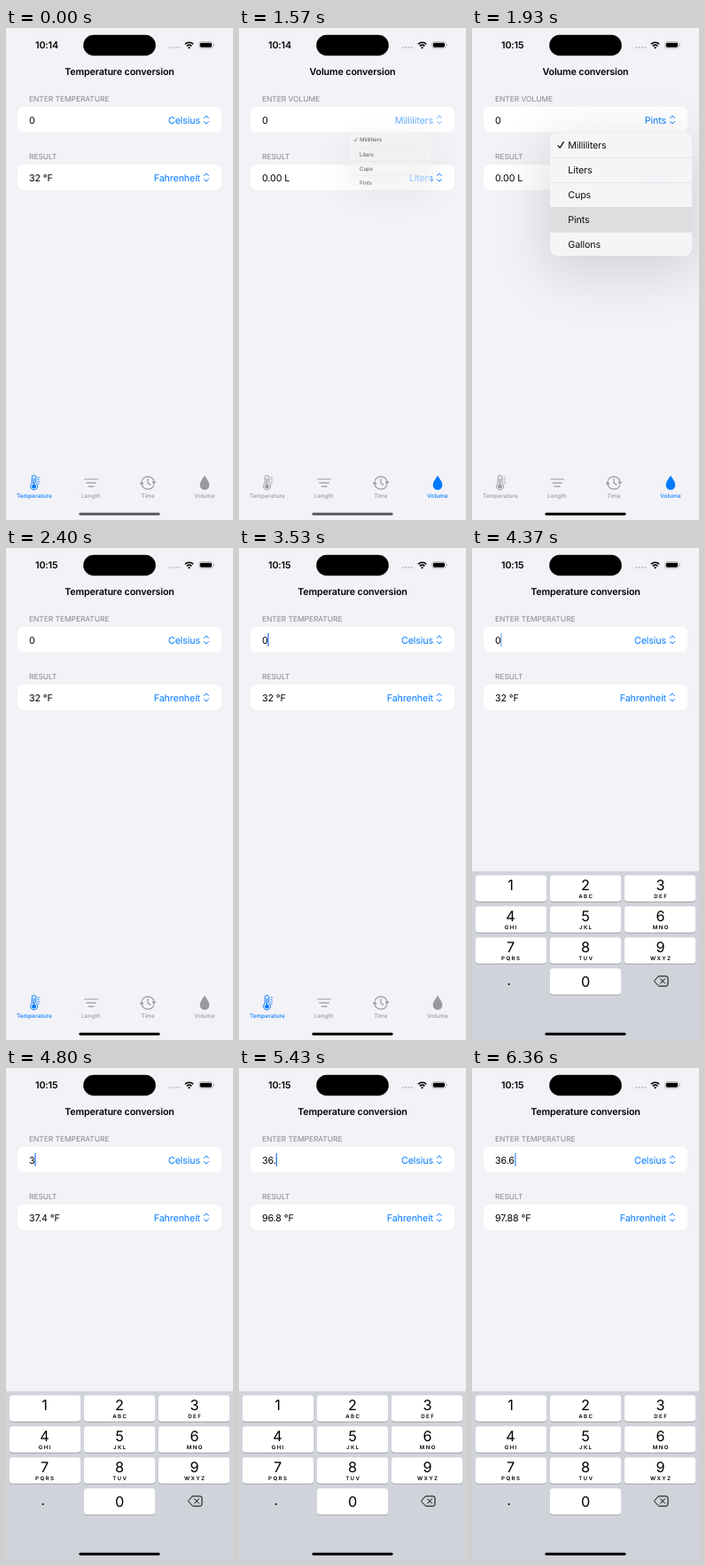
Write an HTML page that moves like this. It is 256 px wide and 555 px high and loops after 6.41 s.

```html
<!DOCTYPE html>
<html lang="en">
<head>
<meta charset="utf-8">
<title>Unit converter</title>
<style>
html, body { margin: 0; width: 100%; height: 100%; overflow: hidden; background: #f2f2f7; }
svg { display: block; width: 256px; height: 555px; font-family: Inter, "Liberation Sans", sans-serif; text-rendering: geometricPrecision; }
</style>
</head>
<body>
<svg id="stage" viewBox="0 0 256 555"></svg>
<script>
const LOOP = 6410, BLUE = '#007aff', GREY = '#98989d', INK = '#000';
const stage = document.getElementById('stage');
const clamp = v => Math.max(0, Math.min(1, v));
// Last row whose start time has passed
const at = (rows, t) => rows.filter(r => r[0] <= t).pop();

const TABS = ['Temperature', 'Length', 'Time', 'Volume'];
const UNITS = [['Celsius', 'Fahrenheit'], ['Meters', 'Kilometers'], ['Seconds', 'Minutes'], ['Milliliters', 'Liters']];
const RESULTS = ['32 °F', '0 km', '0.00 min', '0.00 L'];
const TAB_TIMES = [[0, 0], [530, 1], [870, 2], [1130, 3], [2400, 0]];
// time, entry, caret x, result
const ENTRIES = [
  [3530, '0', 33, '32 °F'], [4470, '', 26.7, '32 °F'], [4700, '3', 33, '37.4 °F'],
  [4930, '36', 39.3, '96.8 °F'], [5430, '36.', 42.3, '96.8 °F'], [5770, '36.6', 48.9, '97.88 °F']
];
// key, down, up
const PRESSES = [['del', 4430, 4500], ['3', 4670, 4770], ['6', 4900, 4970], ['6', 5730, 5800]];
const BLINKS = [4180, 5310, 6150];
const LETTERS = ['', 'ABC', 'DEF', 'GHI', 'JKL', 'MNO', 'PQRS', 'TUV', 'WXYZ'];

const text = (s, x, y, size, fill = INK, extra = '') =>
  `<text x="${x}" y="${y}" font-size="${size}" fill="${fill}" ${extra}>${s}</text>`;
const rect = (x, y, w, h, r, fill, extra = '') =>
  `<rect x="${x}" y="${y}" width="${w}" height="${h}" rx="${r}" fill="${fill}" ${extra}/>`;
const line = (d, color, width, extra = '') =>
  `<path d="${d}" fill="none" stroke="${color}" stroke-width="${width}" stroke-linecap="round" stroke-linejoin="round" ${extra}/>`;
const body = (s, x, y, fill, extra = '') => text(s, x, y, 10.7, fill, 'letter-spacing="-.12" ' + extra);

function statusBar(t) {
  let s = body(t < 1900 ? '10:14' : '10:15', 33, 23, INK, 'font-weight="600"');
  s += rect(87.2, 7.7, 81.6, 23.5, 11.75, INK);
  for (let i = 0; i < 4; i++) s += `<circle cx="${185 + i * 3.4}" cy="22" r="1.1" fill="#bdbdc2"/>`;
  s += line('M201.9 18.2a6.8 6.8 0 0 1 9.4 0M203.8 20.4a4.2 4.2 0 0 1 5.6 0', INK, 1.5, 'style="stroke-linecap:butt"');
  s += '<path d="M206.6 23.6l-1.6-1.7a2.4 2.4 0 0 1 3.2 0z"/>';
  s += rect(217.6, 15.5, 15.6, 7.4, 2.4, 'none', 'stroke="#a5a5a9" stroke-width=".7"');
  s += rect(218.8, 16.7, 13.2, 5, 1.4, INK);
  return s + '<path d="M234.2 18v2.6q1-.3 1-1.3t-1-1.3" fill="#a5a5a9"/>';
}

function field(label, value, unit, y, fade = 1) {
  return text(label, 26, y - 6.1, 8.4, '#85858a') +
    rect(13, y, 230, 28.5, 6.5, '#fff') + body(value, 26, y + 18.4) +
    `<g opacity="${fade}">` + body(unit, 219, y + 18.4, BLUE, 'text-anchor="end"') +
    line(`M223.4 ${y + 12.4}l2.5-2.5 2.5 2.5m-5 4l2.5 2.5 2.5-2.5`, BLUE, 1) + '</g>';
}

const ICONS = [
  c => line('M29.3 513.6V506.8a2.2 2.2 0 0 1 4.4 0V513.6a4 4 0 1 1-4.4 0z', c, 1) +
    line('M31.5 508.5v8', c, 1.2) + `<circle cx="31.5" cy="517.2" r="2.4" fill="${c}"/>` +
    line('M35.8 507h2M35.8 509.4h1.3M35.8 511.8h2M35.8 514.2h1.3', c, .8),
  c => line('M88.8 509h14.6M90.8 513.1h10.6M93.2 517.2h5.8', c, 1.2),
  c => line('M153.4 510.3a7.2 7.2 0 0 1 13.6 1.6M166.6 515.9a7.2 7.2 0 0 1-13.6-1.6M160 508.6v4.6l3 2.2', c, 1.2) +
    `<path d="M164.4 511.8h5l-2.5 3.3zM150.6 514.4h5l-2.5-3.3z" fill="${c}"/>`,
  c => `<path d="M224 504.8c1.6 3.2 5.3 6.6 5.3 10.9a5.3 5.3 0 0 1-10.6 0c0-4.3 3.7-7.7 5.3-10.9z" fill="${c}"/>`
];

function tabBar(active) {
  return TABS.map((name, i) => {
    const c = i === active ? BLUE : GREY;
    return ICONS[i](c) + text(name, 31.9 + i * 64, 530, 6.4, c, 'text-anchor="middle" font-weight="500" letter-spacing=".08"');
  }).join('');
}

function menu(t) {
  if (t < 1570 || t >= 2000) return '';
  const p = 1 - (1 - clamp((t - 1570) / 160)) ** 2.5;
  const out = t >= 1970 ? .45 : 1;
  const scale = (.57 + .43 * p) * (out < 1 ? .8 : 1);
  const h = 139 * (.73 + .27 * p);
  let s = rect(80, 126, 176, h + 14, 20, INK, `opacity="${.04 + .08 * p}" filter="url(#soft)"`);
  s += `<clipPath id="panel">${rect(88, 118, 160, h, 8, INK)}</clipPath>`;
  s += `<g clip-path="url(#panel)" opacity="${.65 + .35 * p}">` + rect(88, 118, 160, h, 8, '#f6f6f8', 'opacity=".97"');
  if (t >= 1900) s += rect(88, 202, 160, 28, 0, '#dedee0');
  ['Milliliters', 'Liters', 'Cups', 'Pints', 'Gallons'].forEach((name, i) => {
    const y = 118 + i * 28;
    if (i) s += rect(88, y, 160, .5, 0, '#d3d3d7');
    s += body(name, 108.3, y + 18, '#0c0c0d');
  });
  s += line('M97 132.6l2.2 2.6 4-6.6', INK, 1.2) + '</g>';
  return `<g opacity="${out}" transform="translate(174 118) scale(${scale}) translate(-174 -118)">${s}</g>`;
}

function keyboard(t) {
  if (t < 3600) return '';
  const k = (t - 3575) / 52;
  const drop = t >= 4000 ? 0 : 190 * (1 + k) * Math.exp(-k);
  const down = key => PRESSES.some(p => p[0] === key && t >= p[1] && t < p[2]);
  const cap = (key, x, y) => rect(x, y + .8, 80, 29.4, 3.2, '#8b8d92') +
    rect(x, y, 80, 29.4, 3.2, down(key) ? '#b4b8c1' : '#fff');
  const digit = (n, x, y) => text(n, x, y, 16.2, INK, 'text-anchor="middle"');
  let s = rect(0, 364.6, 256, 191, 0, '#d1d3da');
  LETTERS.forEach((abc, i) => {
    const col = i % 3 - 1, y = 369.3 + Math.floor(i / 3) * 35, x = 128 + col * 84.5;
    s += cap(String(i + 1), 88 + col * 84, y) + digit(i + 1, x, y + 16.6) +
      text(abc, x + .7, y + 25.5, 6.1, INK, 'text-anchor="middle" font-weight="600" letter-spacing="1.4"');
  });
  s += cap('0', 88, 474.3) + digit(0, 128, 495) + digit('.', 41.5, 493);
  const del = down('del');
  s += line('M210.6 483h8.4a2 2 0 0 1 2 2v7.2a2 2 0 0 1-2 2h-8.4l-4.6-4.9q-.5-.7 0-1.4z', INK, 1,
    del ? 'style="fill:#000"' : '');
  s += line('M212.6 486l5 5.2m0-5.2l-5 5.2', del ? '#fff' : INK, 1);
  return `<g transform="translate(0 ${drop})">${s}</g>`;
}

function caret(t, x) {
  const b = BLINKS.filter(v => v <= t).pop();
  const d = t - b;
  const alpha = b === undefined || x > 42 && t < 6150 || d > 220 ? 1 : d < 150 ? clamp(1 - d / 80) : (d - 150) / 70;
  return rect(x - .65, 96, 1.3, 15, .6, '#2f7cf6', `opacity="${alpha}"`);
}

function scene(t) {
  const tab = at(TAB_TIMES, t)[1], name = TABS[tab], entry = at(ENTRIES, t);
  const [from, to] = UNITS[tab];
  const picked = tab === 3 && t >= 1930;
  const fade = t >= 1570 && t < 1930 ? .6 - .3 * clamp((t - 1570) / 160) : 1;
  return '<filter id="soft" x="-100%" y="-100%" width="300%" height="300%"><feGaussianBlur stdDeviation="30"/></filter>' +
    statusBar(t) +
    body(name + ' conversion', 128, 53.3, INK, 'text-anchor="middle" font-weight="600"') +
    field('ENTER ' + name.toUpperCase(), entry ? entry[1] : '0', picked ? 'Pints' : from, 89.1, fade) +
    field('RESULT', entry ? entry[3] : RESULTS[tab], to, 154.2) +
    (entry ? caret(t, entry[2]) : '') +
    tabBar(tab) + menu(t) + keyboard(t) +
    rect(82.4, 546.8, 91.2, 2.9, 1.45, t < 1900 ? '#5a5a5d' : INK);
}

let shown = '';
function draw() {
  const next = scene(performance.now() % LOOP);
  if (next !== shown) stage.innerHTML = shown = next;
  requestAnimationFrame(draw);
}
draw();
</script>
</body>
</html>
```
